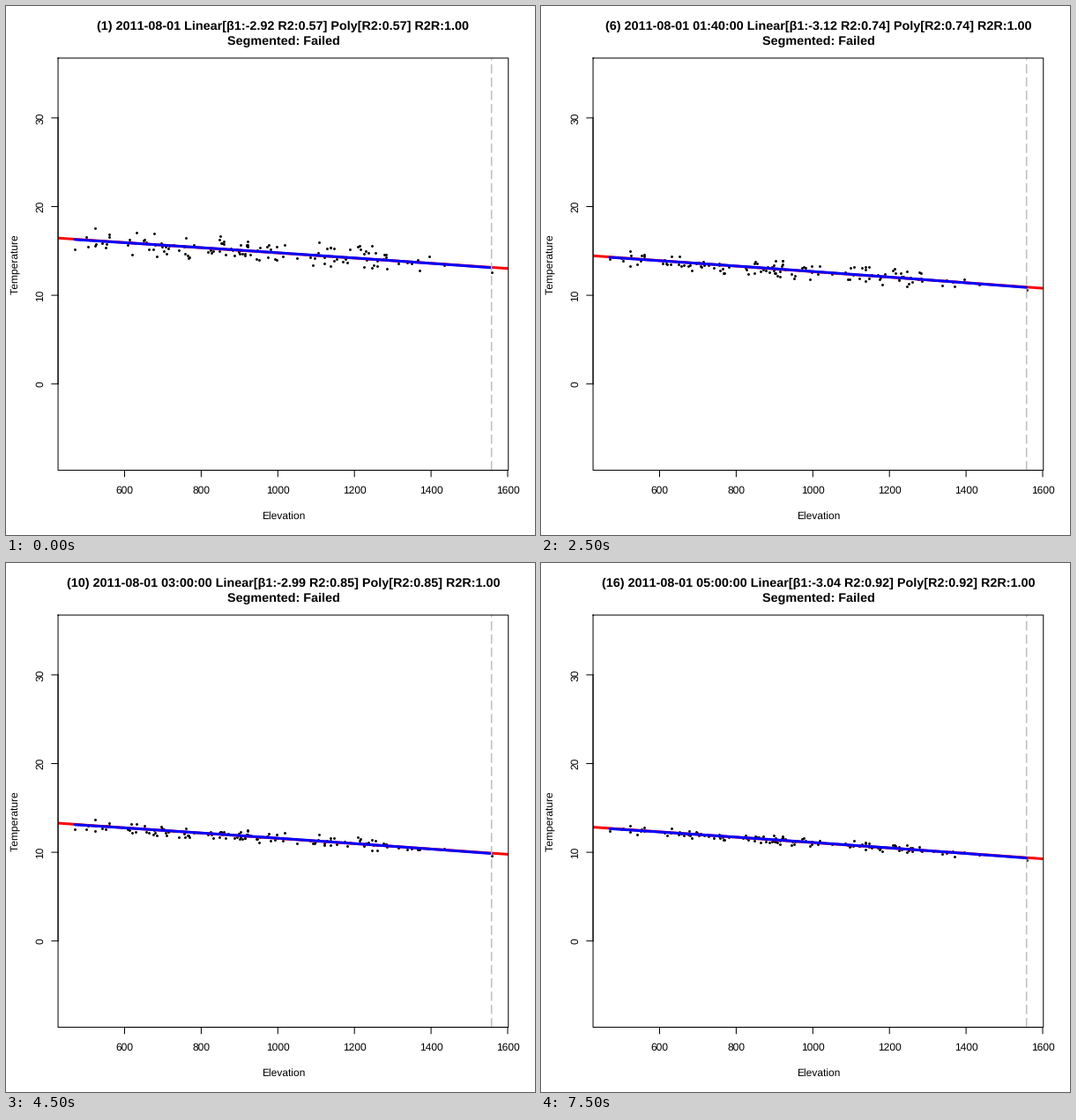
These frames come from a looping animation (600 by 600 pixels, 8 s). A matplotlib script:

```python
import numpy as np
import matplotlib.pyplot as plt
from matplotlib.animation import FuncAnimation

plt.rcParams.update({
    "font.family": "Liberation Sans",
    "text.hinting": "none",
    "text.kerning_factor": 6,  # practically no kerning
    "toolbar": "None",
})

PX = 0.72  # points per pixel at 100 dpi
STEPS = 16
LEFT, RIGHT, TOP, BOTTOM = 59.04, 569.76, 59.04, 526.56
MID_X, MID_Y = (LEFT + RIGHT) / 2, (TOP + BOTTOM) / 2
LOW, HIGH = 78.0, 550.7  # lowest and highest station
X_SCALE, Y_SCALE = 0.4345, 10.06  # pixels per metre and per degree
STATIONS = 135


def x_of(elevation):
    return 308.3 + (elevation - 1000) * X_SCALE


def y_of(temperature):
    return 428.7 - temperature * Y_SCALE


def keyed(*values):
    """Spread values known at a few steps over all steps."""
    return np.interp(np.arange(STEPS), [0, 3, 5, 8, 11, 13, 15], values)


start = keyed(263.2, 276.4, 283.3, 293.1, 299.0, 300.7, 299.6)
slope = keyed(-2.92, -3.01, -3.12, -3.01, -2.95, -2.80, -3.04)
r2 = keyed(0.57, 0.65, 0.74, 0.83, 0.88, 0.90, 0.92)

# Each station keeps most of its offset; the rest is new at every step
rng = np.random.default_rng(11)
station_x = LOW + (HIGH - LOW) * rng.beta(1.6, 2.0, STATIONS)
station_x[:2] = LOW, HIGH
steady = rng.normal(0, 1, STATIONS)
fresh = rng.normal(0, 1, (STEPS, STATIONS))
offset = np.clip(0.87 * steady + 0.5 * fresh, -2.2, 1.9)

fig = plt.figure(figsize=(6, 6), dpi=100, facecolor="white")
ax = fig.add_axes([0, 0, 1, 1])
ax.set_xlim(0, 600)
ax.set_ylim(600, 0)
ax.axis("off")


def line(xs, ys, color="black", width=1.0, **kw):
    return ax.plot(xs, ys, color=color, lw=width * PX, snap=False, **kw)[0]


def label(x, y, text, size=12, **kw):
    return ax.text(x, y, text, fontsize=size * PX, ha="center",
                   va="baseline", rotation_mode="anchor", **kw)


# Frame and axes
line([LEFT, RIGHT, RIGHT, LEFT, LEFT], [TOP, TOP, BOTTOM, BOTTOM, TOP],
     solid_joinstyle="miter", zorder=5)
line([LEFT, LEFT], [y_of(30), y_of(0)], zorder=5)
line([x_of(600), x_of(1600)], [BOTTOM, BOTTOM], zorder=5)
for elevation in range(600, 1601, 200):
    x = x_of(elevation)
    line([x, x], [BOTTOM, BOTTOM + 7.2])
    label(x, 553, str(elevation))
for temperature in range(0, 31, 10):
    y = y_of(temperature)
    line([LEFT - 7.2, LEFT], [y, y])
    label(42, y, str(temperature), rotation=90)
label(MID_X, 582, "Elevation")
label(13, MID_Y, "Temperature", rotation=90)

# Data layers
dots = ax.plot([], [], "o", color="black", ms=2.9 * PX, mew=0, zorder=2)[0]
linear = line([], [], "#ff0000", 3, solid_capstyle="butt", zorder=3)
poly = line([], [], "#0000ff", 3, solid_capstyle="round", zorder=4)
line([HIGH, HIGH], [BOTTOM, TOP], "#bebebe", 1.5, zorder=4.5,
     dashes=(7, 3), dash_capstyle="butt")

title = label(MID_X, 27, "", 14.4, weight="bold")
label(MID_X + 1, 44, "Segmented: Failed", 14.4, weight="bold")


def trend(step, x):
    return start[step] - slope[step] / 1000 * Y_SCALE / X_SCALE * (x - LEFT)


def stamp(step):
    minutes = step * 20
    clock = f" {minutes // 60:02d}:{minutes % 60:02d}:00" if minutes else ""
    return "2011-08-01" + clock


def draw(step):
    ends = np.array([LEFT, RIGHT])
    linear.set_data(ends, trend(step, ends))

    # The polynomial sags slightly below the straight fit at both ends
    x = np.linspace(LOW, HIGH, 60)
    u = 2 * (x - LOW) / (HIGH - LOW) - 1
    poly.set_data(x, trend(step, x) + 0.6 * u * u - 0.2)

    # A better fit means less scatter
    scatter = 7.8 * np.sqrt(1 / r2[step] - 1)
    dots.set_data(station_x, trend(step, station_x) + scatter * offset[step])

    title.set_text(f"({step + 1}) {stamp(step)} Linear[β1:{slope[step]:.2f} "
                   f"R2:{r2[step]:.2f}] Poly[R2:{r2[step]:.2f}] R2R:1.00")
    return linear, poly, dots, title


anim = FuncAnimation(fig, draw, frames=STEPS, interval=500, repeat=True,
                     repeat_delay=0, blit=False)
plt.show()
```
